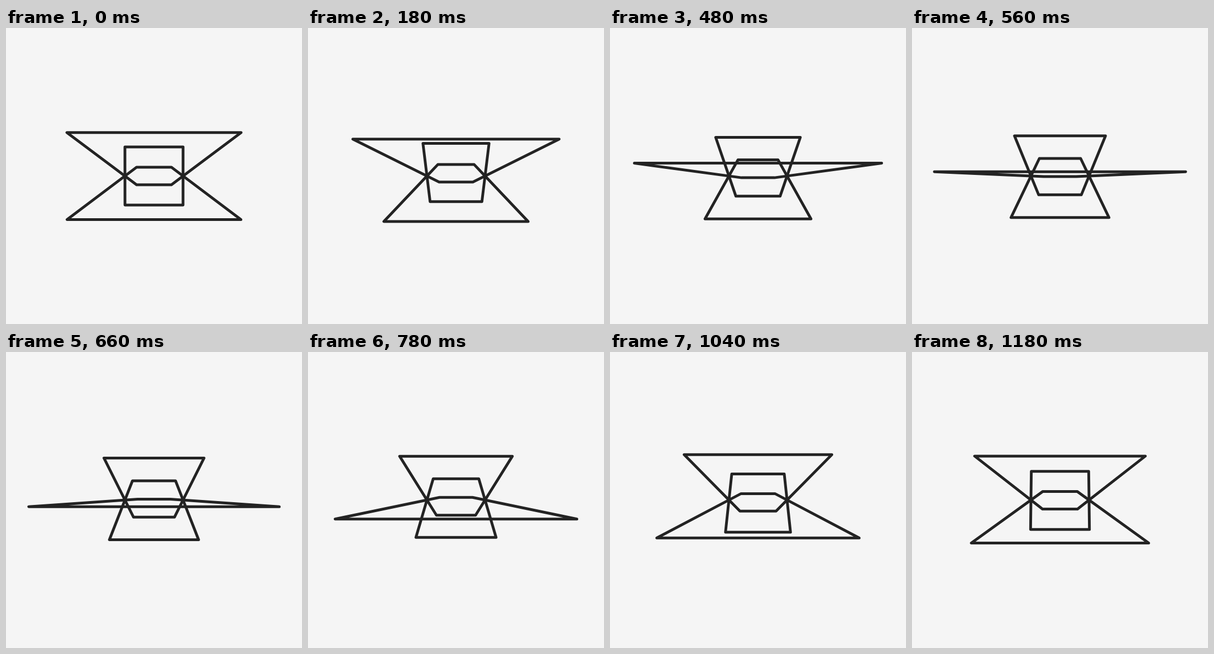
Animation, 540 px wide and 540 px high, one loop 1200 ms. Source, as an HTML page:

```html
<!DOCTYPE html>
<html lang="en">
<head>
<meta charset="utf-8">
<title>Turning squares</title>
<style>
  html, body { margin: 0; width: 100%; height: 100%; overflow: hidden; background: #f5f5f5; }
  svg { display: block; width: 100vw; height: 100vh; }
  polygon { fill: none; stroke: #232323; stroke-width: 5; stroke-linejoin: round; }
</style>
</head>
<body>
<svg viewBox="0 0 540 540">
  <polygon/>
  <polygon/>
  <polygon/>
</svg>
<script>
  const LOOP = 1200;
  const CENTER = 270;
  const HALF = 53;            // half the side of each square
  const DEPTH = 1.3 * HALF;   // distance from the eye to the shared axis
  const TURN = Math.PI / 3;   // angle between squares, and the turn per loop
  const squares = [...document.querySelectorAll('polygon')];

  // Perspective view of a corner of a square turned about the horizontal axis.
  function corner(x, y, angle) {
    const scale = DEPTH / (DEPTH + y * Math.sin(angle));
    const px = CENTER + x * scale;
    const py = CENTER + y * Math.cos(angle) * scale;
    return px.toFixed(3) + ',' + py.toFixed(3);
  }

  function draw(time) {
    const phase = (time % LOOP) / LOOP;
    squares.forEach((square, i) => {
      const angle = (i + phase) * TURN;
      square.setAttribute('points', [
        corner(-HALF, -HALF, angle),
        corner(HALF, -HALF, angle),
        corner(HALF, HALF, angle),
        corner(-HALF, HALF, angle)
      ].join(' '));
    });
  }

  const start = performance.now();
  function tick(now) {
    draw(Math.max(0, now - start));
    requestAnimationFrame(tick);
  }
  draw(0);
  requestAnimationFrame(tick);
</script>
</body>
</html>
```
